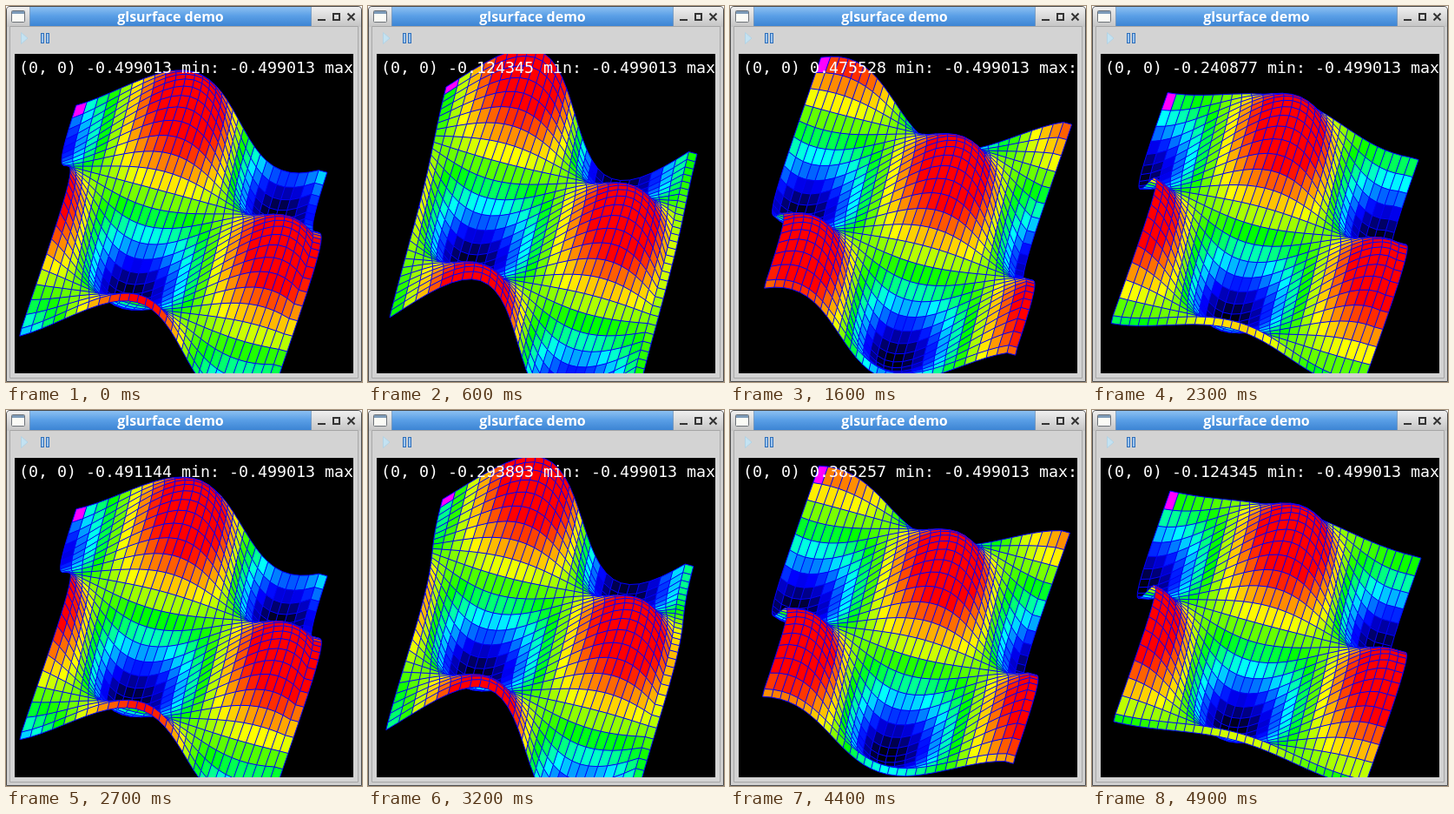
An HTML page with a canvas that plays this animation: 410x432 px, repeating every 5 s.

```html
<!DOCTYPE html>
<html lang="en">
<head>
<meta charset="utf-8">
<title>glsurface demo</title>
<style>
  html, body { margin: 0; width: 100%; height: 100%; overflow: hidden; background: #fff; }
  #win { position: absolute; left: 0; top: 0; width: 410px; height: 432px; overflow: hidden; }
  #win > * { position: absolute; }
  #chrome { left: 0; top: 0; }
  #title { left: 27px; top: 1px; width: 325px; height: 23px; text-align: center;
    color: #fff; font: 700 16px/23px "Open Sans", "Noto Sans", sans-serif; }
  #view { left: 10px; top: 55px; width: 390px; height: 367px; overflow: hidden; background: #000; }
  #view > * { position: absolute; }
  #mesh { left: 0; top: 0; }
  #label { left: 5px; top: 5px; white-space: pre; color: #fff;
    font: 18.27px/22px "DejaVu Sans Mono", monospace; }
</style>
</head>
<body>
<div id="win">
  <svg id="chrome" width="410" height="432" viewBox="0 0 410 432">
    <defs>
      <linearGradient id="blue" x2="0" y2="1">
        <stop offset="0" stop-color="#8cc0f2"/>
        <stop offset=".45" stop-color="#5a9fe6"/>
        <stop offset="1" stop-color="#3a82d2"/>
      </linearGradient>
      <linearGradient id="grey" x2="0" y2="1">
        <stop offset="0" stop-color="#f0f0f0"/>
        <stop offset="1" stop-color="#c4c4c4"/>
      </linearGradient>
    </defs>
    <path d="M.5 431.5V5Q.5.5 5 .5H405Q409.5.5 409.5 5V431.5Z" fill="#cfcfcf" stroke="#4a4a4a"/>
    <path d="M1 24V5Q1 1 5 1H405Q409 1 409 5V24Z" fill="url(#grey)"/>
    <rect x="27" y="1" width="325" height="23" fill="url(#blue)"/>
    <path d="M27.5 1V23M351.5 1V23" stroke="#8a9aac" stroke-opacity=".6"/>
    <path d="M4.5 427.5V23.5H405.5V427.5Z" fill="#d3d3d3" stroke="#a6a6a6"/>
    <rect x="6.500" y="5.500" width="15" height="13" rx="1" fill="#fbfbf6" stroke="#6d7278"/>
    <rect x="7" y="6" width="14" height="3" fill="#7d9bb8"/>
    <g fill="none" stroke="#333" stroke-width="2">
      <path d="M359 16H368M393.500 8.500L401.500 16.500M401.500 8.500L393.500 16.500"/>
      <rect x="377" y="9" width="7" height="7"/>
    </g>
    <path d="M17.500 30.500L25 37L17.500 43.500Z" fill="#c3e2f2" stroke="#b4d3e4"/>
    <g fill="#9cc4ee" stroke="#2f6fba">
      <rect x="40.500" y="31.500" width="3" height="11"/>
      <rect x="46.500" y="31.500" width="3" height="11"/>
    </g>
  </svg>
  <div id="title">glsurface demo</div>
  <div id="view">
    <canvas id="mesh" width="390" height="367"></canvas>
    <div id="label"></div>
  </div>
</div>
<script>
const ctx = document.getElementById('mesh').getContext('2d');
const label = document.getElementById('label');
const N = 30, TAU = 2 * Math.PI, LOOP = 5000, FRAME = 100;

// The wave clock ticks a little unevenly: [frame, tick]
const clock = [[0, -13], [6, -2], [16, 15], [23, 29], [32, 45], [39, 59], [49, 77]];
// Height to colour: [z, r, g, b]
const ramp = [[-1, 0, 0, 0], [-.74, 0, 0, 255], [-.44, 0, 255, 255],
  [-.14, 0, 255, 0], [.17, 255, 255, 0], [.66, 255, 0, 0], [1, 255, 0, 0]];

function lerp(table, x, col) {
  let i = 1;
  while (i < table.length - 1 && x > table[i][0]) i++;
  const a = table[i - 1], b = table[i];
  return a[col] + (b[col] - a[col]) * (x - a[0]) / (b[0] - a[0]);
}

const colour = z => `rgb(${[1, 2, 3].map(c => Math.round(lerp(ramp, z, c)))})`;

// N samples span one full wave; the outermost edge repeats the last sample
const angle = i => Math.min(i, N - 1) / (N - 1) * TAU;

function draw(frame) {
  const t = Math.round(lerp(clock, frame, 1)) * TAU / 100;
  const height = (i, j) => Math.sin(angle(i) + t) * Math.cos(angle(j) + t);
  const project = (i, j) => {
    const z = height(i, j), a = i / N, b = j / N;
    return [83 + 289 * a - 65 * b + 24.5 * z, 31 + 77 * a + 265 * b - 56.5 * z];
  };
  const trace = points => {
    ctx.beginPath();
    for (const p of points) ctx.lineTo(...p);
  };

  ctx.clearRect(0, 0, 390, 367);
  ctx.lineWidth = 1;
  ctx.lineJoin = 'round';
  ctx.strokeStyle = '#00f';
  // Far rows first, so that near slopes cover them
  for (let j = 0; j < N; j++) {
    for (let i = N - 1; i >= 0; i--) {
      const quad = [project(i, j), project(i + 1, j), project(i + 1, j + 1), project(i, j + 1)];
      trace(quad);
      ctx.fillStyle = i + j ? colour(height(i, j)) : '#f0f';
      ctx.fill();
      // Shared edges are stroked once, by the cell drawn last
      trace(quad.slice(0, 3));
      if (j === N - 1) ctx.lineTo(...quad[3]);
      if (i === 0) {
        ctx.moveTo(...quad[3]);
        ctx.lineTo(...quad[0]);
      }
      ctx.stroke();
    }
  }
  label.textContent = `(0, 0) ${height(0, 0).toFixed(6)} min: -0.499013 max: 0.499013`;
}

let shown = -1;
const start = performance.now();
function tick() {
  const frame = Math.floor((performance.now() - start) % LOOP / FRAME);
  if (frame !== shown) draw(shown = frame);
  requestAnimationFrame(tick);
}
tick();
</script>
</body>
</html>
```
